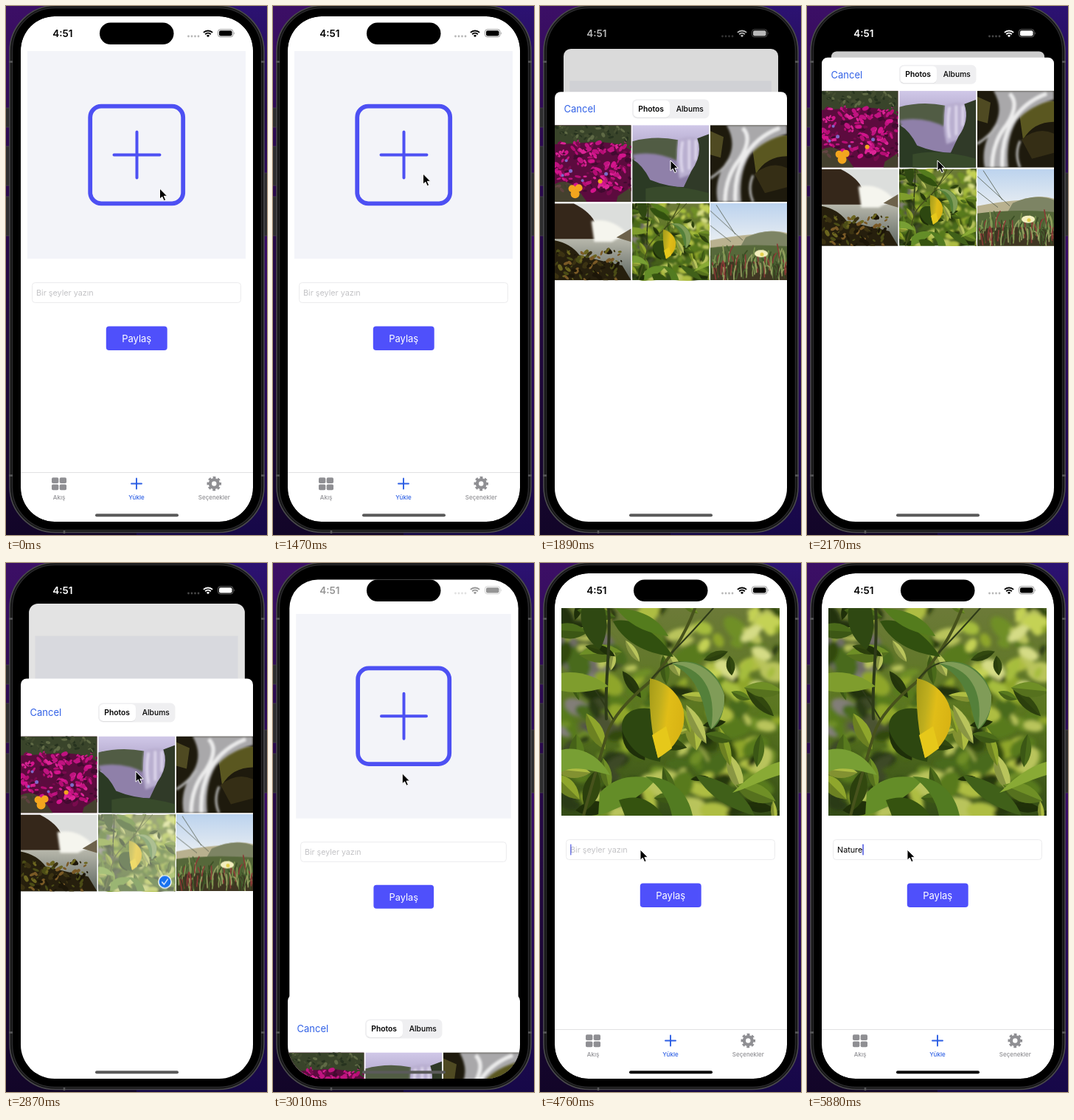
Write an HTML page that moves like this. It is 354 px wide and 716 px high and loops after 6.02 s.

```html
<!DOCTYPE html>
<html lang="tr">
<head>
<meta charset="utf-8">
<style>
  html, body { margin: 0; width: 100%; height: 100%; overflow: hidden; background: #1c0a4c; }
  svg { display: block; }
  #stage { width: 354px; height: 716px; }
  text { font-family: Inter, "Open Sans", sans-serif; }
  .mid { text-anchor: middle; }
  .tab { font-size: 8px; font-weight: 500; }
</style>
</head>
<body>
<svg id="stage" viewBox="0 0 354 716">
  <defs>
    <linearGradient id="wallL" x2="0" y2="1">
      <stop offset="0" stop-color="#3c0f66"/><stop offset=".25" stop-color="#2c0a50"/>
      <stop offset=".6" stop-color="#22083f"/><stop offset="1" stop-color="#120528"/>
    </linearGradient>
    <linearGradient id="wallR" x2="0" y2="1">
      <stop offset="0" stop-color="#2c1272"/><stop offset=".2" stop-color="#220a4c"/>
      <stop offset=".45" stop-color="#380c66"/><stop offset="1" stop-color="#160848"/>
    </linearGradient>
    <linearGradient id="mist" x2="0" y2="1">
      <stop offset="0" stop-color="#d0c8e8"/><stop offset=".7" stop-color="#8d7fa8"/>
    </linearGradient>
    <linearGradient id="sky" x2="0" y2="1">
      <stop offset="0" stop-color="#bcd3ee"/><stop offset=".5" stop-color="#e9eef2"/>
    </linearGradient>
    <linearGradient id="pool" x2="0" y2="1">
      <stop offset="0" stop-color="#b8b8ac"/><stop offset="1" stop-color="#5e6660"/>
    </linearGradient>
    <linearGradient id="gold" y2=".3">
      <stop offset="0" stop-color="#a59b18"/><stop offset=".35" stop-color="#bfae1e"/>
      <stop offset=".6" stop-color="#e0bd18"/><stop offset="1" stop-color="#d9b414"/>
    </linearGradient>
    <linearGradient id="wood" x2="0" y2="1">
      <stop offset="0" stop-color="#6c7a38"/><stop offset=".5" stop-color="#5a761f"/><stop offset="1" stop-color="#344c17"/>
    </linearGradient>
    <filter id="soft"><feGaussianBlur stdDeviation="2.4"/></filter>
    <filter id="haze"><feGaussianBlur stdDeviation="1.4"/></filter>
    <clipPath id="screen"><rect x="20" y="14" width="315" height="684" rx="46"/></clipPath>
    <clipPath id="cardClip"><rect id="cardShape" x="20" y="14" width="315" height="684"/></clipPath>

    <symbol id="leafPic" viewBox="0 0 296 281" preserveAspectRatio="xMidYMid slice">
      <rect width="296" height="281" fill="url(#wood)"/>
      <g id="bokeh" filter="url(#soft)"></g>
      <g id="sprigs"></g>
      <g fill="none" stroke="#2e3a18" stroke-linecap="round">
        <path d="M64 0C68 50 58 100 61 150" stroke-width="4"/>
        <path d="M182 -2C165 45 140 75 122 98C95 120 70 145 62 170C50 210 38 250 30 281" stroke="#47521c" stroke-width="4"/>
        <path d="M120 98C140 75 152 72 166 74M70 150C55 125 42 100 25 92M150 60C170 40 190 18 206 0" stroke-width="2"/>
      </g>
      <path d="M28 -2C22 22 34 44 52 56C64 36 62 15 58 -2Z" fill="#2f4812"/>
      <path d="M70 18C98 10 132 35 152 66C122 62 88 52 70 18Z" fill="#31500f"/>
      <path d="M74 0C104 2 130 10 145 38C116 34 92 24 74 0Z" fill="#547c1d"/>
      <path d="M0 88C22 84 48 92 64 106C40 114 18 116 0 112Z" fill="#7f9d2d"/>
      <path d="M120 136C92 132 76 150 84 170C96 196 114 205 134 208C138 180 134 150 120 136Z" fill="#2d4710"/>
      <path d="M150 75C185 64 215 88 221 118C222 144 212 160 203 164C194 150 196 122 176 96C168 86 158 80 150 75Z" fill="#54803a"/>
      <path d="M150 75C190 80 212 110 203 164C214 152 222 140 221 118C212 88 182 66 150 75Z" fill="#809c58"/>
      <path d="M0 192C26 186 52 200 66 226C40 220 18 212 0 222Z" fill="#789f34"/>
      <path d="M52 250C76 224 105 226 128 232C112 252 88 268 50 281Z" fill="#648d28"/>
      <path d="M114 228C150 228 172 250 178 281L150 281C146 258 132 240 114 228Z" fill="#527b21"/>
      <path d="M78 260C104 250 126 262 138 281H86Z" fill="#35530f"/>
      <path d="M182 226C220 230 250 250 262 281C230 272 202 258 182 226Z" fill="#406019"/>
      <path d="M232 250C254 228 274 214 296 208V226C274 232 252 244 232 250Z" fill="#89aa35"/>
      <path d="M120 95C146 100 171 125 166 155C162 180 145 195 131 203C122 170 118 130 120 95Z" fill="url(#gold)"/>
      <path d="M123 172L142 160L150 190L131 203Z" fill="#e6c81a"/>
    </symbol>

    <symbol id="pic0" viewBox="0 0 104 104">
      <rect width="104" height="104" fill="#5c0b3e"/>
      <path d="M0 0H104V34C80 18 50 24 0 26Z" fill="#39442a"/>
      <g id="petals"></g>
      <path d="M0 80Q18 70 34 90L44 104H0ZM104 84L86 96L84 104H104Z" fill="#3d5228" opacity=".75"/>
      <g fill="#7e69c8"><circle cx="22" cy="62" r="2.5"/><circle cx="11" cy="68" r="2"/><circle cx="70" cy="66" r="2.5"/><circle cx="38" cy="75" r="2"/><circle cx="16" cy="48" r="2"/></g>
      <g fill="#f3a51e"><circle cx="24" cy="86" r="5"/><circle cx="33" cy="85" r="5"/><circle cx="28" cy="93" r="6"/><circle cx="62" cy="76" r="3"/></g>
    </symbol>
    <symbol id="pic1" viewBox="0 0 104 104">
      <rect width="104" height="104" fill="url(#mist)"/>
      <path d="M0 22Q30 14 62 20L60 52Q40 50 26 44Q14 42 0 48Z" fill="#515c44"/>
      <g filter="url(#haze)">
        <path d="M0 40Q34 34 64 50L70 82H18Z" fill="#8f80a9"/>
        <path d="M62 20Q76 14 90 18Q92 44 80 66L64 72Q58 46 62 20Z" fill="#b9afd0"/>
        <path d="M68 22Q64 44 68 64M77 20V60M86 20V48" fill="none" stroke="#e2dcf0" stroke-width="3"/>
      </g>
      <path d="M104 12L88 18Q96 40 80 62L60 104H104Z" fill="#303a28"/>
      <path d="M0 46Q14 54 24 74Q48 84 74 84L64 104H0Z" fill="#2b3a24"/>
      <path d="M18 86Q52 78 104 92V104H18Z" fill="#384a2b"/>
    </symbol>
    <symbol id="pic2" viewBox="0 0 104 104">
      <rect width="104" height="104" fill="#1e1a0d"/>
      <path d="M56 24Q78 12 104 14V42Q76 42 62 66Z" fill="#5a5720"/>
      <path d="M60 66Q82 48 104 58V84L74 92Z" fill="#352e15"/>
      <path d="M0 8L18 16L14 44L0 40Z" fill="#4f4a22"/>
      <g filter="url(#haze)">
        <path d="M22 0H104V12Q72 20 54 40Q38 66 42 104H10Q4 74 24 46Q36 24 22 0Z" fill="#a9a8aa"/>
        <path d="M44 4Q58 18 40 46Q20 70 20 104M94 4Q62 16 46 44Q32 70 34 104" fill="none" stroke="#ececec" stroke-width="5"/>
        <path d="M58 68Q50 86 58 104M0 72Q16 62 28 46" fill="none" stroke="#b8b8b8" stroke-width="3"/>
      </g>
    </symbol>
    <symbol id="pic3" viewBox="0 0 104 104">
      <rect width="104" height="104" fill="#dcdedc"/>
      <path d="M0 0H26Q50 12 56 28V56H0Z" fill="#35271a"/>
      <path d="M0 48H104V104H0Z" fill="url(#pool)"/>
      <path d="M50 24Q76 18 98 40L78 52H54Z" fill="#f5f5ee" filter="url(#haze)"/>
      <path d="M104 34L84 46L104 52Z" fill="#6d624b"/>
      <path d="M0 50Q22 54 34 70Q64 78 92 84L104 104H0Z" fill="#261f0d"/>
      <g id="moss"></g>
    </symbol>
    <symbol id="pic5" viewBox="0 0 104 104">
      <rect width="104" height="104" fill="url(#sky)"/>
      <path d="M0 50Q30 44 58 42Q84 34 104 40V104H0Z" fill="#b9b18f"/>
      <path d="M48 46Q80 32 104 42V60H40Z" fill="#7d8464"/>
      <path d="M0 60Q50 54 104 58V104H0Z" fill="#56683a"/>
      <path d="M0 82Q50 74 104 84V104H0Z" fill="#3f3622"/>
      <g id="grass" fill="none" stroke-width="1.6"></g>
      <path d="M0 10L44 50M8 2L34 42M0 30L28 52" stroke="#545c4c" stroke-width=".8"/>
      <ellipse cx="69" cy="68" rx="9" ry="5" fill="#f3efbe"/><circle cx="70" cy="69" r="2.5" fill="#e4cf4c"/>
    </symbol>
  </defs>

  <rect width="177" height="716" fill="url(#wallL)"/>
  <rect x="177" width="177" height="716" fill="url(#wallR)"/>
  <g fill="#2d2d2f" stroke="#48484a" stroke-width=".7">
    <rect x="-3" y="138" width="9" height="26" rx="1.5"/>
    <rect x="-3" y="190" width="9" height="53" rx="1.5"/>
    <rect x="-3" y="258" width="9" height="53" rx="1.5"/>
    <rect x="348" y="226" width="9" height="85" rx="1.5"/>
  </g>
  <rect x="5" y="-.5" width="345" height="713" rx="62" fill="#141415" stroke="#4a4a4c" stroke-width="1.6"/>
  <rect x="8.5" y="2.5" width="338" height="707" rx="58" fill="#000" stroke="#29292b" stroke-width="1.5"/>
  <path d="M4 75.5H9M4 635.5H9M346 75.5H351M346 635.5H351M79 710V714" stroke="#58585a" stroke-width="2.5"/>

  <g clip-path="url(#screen)">
    <rect width="354" height="716"/>
    <g id="card"><g clip-path="url(#cardClip)">
      <rect width="354" height="716" fill="#fff"/>
      <g id="empty">
        <rect x="29" y="61" width="296" height="281" fill="#f3f4f9"/>
        <g fill="none" stroke="#4d50f3">
          <rect x="114.2" y="135.7" width="126" height="131.6" rx="15" stroke-width="5.8"/>
          <path d="M177.5 170.5V232.5M146.500 201.5H208.5" stroke-width="4" stroke-linecap="round"/>
        </g>
      </g>
      <use id="chosen" href="#leafPic" x="29" y="61" width="296" height="281"/>
      <rect x="35.5" y="374.5" width="283" height="27" rx="4" fill="#fff" stroke="#ebebed"/>
      <text id="hint" x="41" y="392" font-size="10.8" fill="#c3c3c6">Bir şeyler yazın</text>
      <text id="entry" x="41" y="392" font-size="10.8"></text>
      <rect id="caret" y="380.5" width="1.5" height="15" rx=".7" fill="#4a55e0"/>
      <rect x="135.8" y="433.5" width="82.9" height="32.4" rx="4" fill="#4f50fb"/>
      <text class="mid" x="177.2" y="454.5" font-size="13" fill="#fff">Paylaş</text>
      <path d="M19 631.5H336" stroke="#e1e1e3"/>
      <g fill="#8f8f93">
        <rect x="62" y="638.3" width="9.3" height="7.8" rx="1.8"/><rect x="72.7" y="638.3" width="9.3" height="7.8" rx="1.8"/>
        <rect x="62" y="647.5" width="9.3" height="7.8" rx="1.8"/><rect x="72.7" y="647.5" width="9.3" height="7.8" rx="1.8"/>
        <text class="tab mid" x="72" y="667.5">Akış</text>
        <text class="tab mid" x="282.3" y="667.5">Seçenekler</text>
      </g>
      <g fill="none" stroke="#8f8f93">
        <circle cx="282.3" cy="646.5" r="5.4" stroke-width="4.4"/>
        <circle cx="282.3" cy="646.5" r="8.3" stroke-width="3" stroke-dasharray="3.7 2.819" stroke-dashoffset="1.85"/>
      </g>
      <path d="M177 639.5V653.5M170 646.5H184" stroke="#2d5fe4" stroke-width="1.9" stroke-linecap="round"/>
      <text class="tab mid" x="177" y="667.5" fill="#2d5fe4">Yükle</text>
      <rect id="dim" width="354" height="716"/>
    </g></g>

    <g id="sheet">
      <rect x="20" width="315" height="760" rx="8" fill="#fff"/>
      <g id="bar">
        <text x="32.5" y="28" font-size="13" fill="#3161e6">Cancel</text>
        <rect x="125" y="10" width="104.5" height="26" rx="6.5" fill="#efeff1"/>
        <rect x="126.5" y="12.2" width="49.5" height="23" rx="5.5" fill="#00000018"/>
        <rect x="126.5" y="11.5" width="49.5" height="23" rx="5.5" fill="#fff"/>
        <text class="mid" x="150.7" y="26.8" font-size="10.3" font-weight="600">Photos</text>
        <text class="mid" x="203.3" y="26.8" font-size="10.3" font-weight="500">Albums</text>
      </g>
      <g id="grid">
        <g id="cells"></g>
        <g id="picked">
          <rect x="125.2" y="106" width="104" height="104" fill="#fff" opacity=".35"/>
          <circle cx="215.5" cy="197" r="8.6" fill="#1971ee" stroke="#fff" stroke-width="1.3"/>
          <path d="M211.7 197.5L214.4 200.5L219.3 193.5" fill="none" stroke="#fff" stroke-width="1.3" stroke-linecap="round"/>
        </g>
      </g>
    </g>
  </g>

  <rect x="127" y="22.5" width="100.5" height="29.5" rx="14.75"/>
  <g id="status" fill="currentColor">
    <text class="mid" x="76.8" y="42" font-size="13.5" font-weight="600">4:51</text>
    <g opacity=".28"><circle cx="247.5" cy="41" r="1.4"/><circle cx="252" cy="41" r="1.4"/><circle cx="256.5" cy="41" r="1.4"/><circle cx="261" cy="41" r="1.4"/></g>
    <path d="M267.9 35.9A8.8 8.8 0 0 1 280.1 35.9M270.2 38.3A5.5 5.5 0 0 1 277.8 38.3" fill="none" stroke="currentColor" stroke-width="2"/>
    <path d="M271.9 40A3 3 0 0 1 276.1 40L274 42.2Z"/>
    <rect x="287.5" y="31.7" width="20.5" height="10.2" rx="3.2" fill="none" stroke="currentColor" opacity=".4"/>
    <rect x="289" y="33.2" width="17.5" height="7.2" rx="2"/>
    <path d="M309.2 35V38.8Q310.8 36.9 309.2 35Z" opacity=".45"/>
  </g>
  <rect id="homeBar" x="121" y="687.3" width="113" height="4" rx="2"/>
  <path id="cursor" d="M0 0V14.2L3.3 11.2L5.7 16.6L8.2 15.5L5.8 10.3H10.2Z" stroke="#fff" stroke-width="1" stroke-linejoin="round"/>
</svg>
<script>
const LOOP = 6020, STEP = 70;
const OPEN = 1650, CLOSE = 2833.2, PICK = 2590, LOADED = 3850, FOCUS = 4270;
const SHEET_TOP = 69, SHEET_LOW = 698;
const WORD = 'Nature';
const keyTimes = [4970, 5320, 5530, 5670, 5810, 5880];
const trail = [ // time, x, y
  [0, 208.5, 247], [490, 203.5, 227], [1610, 203.5, 227], [1890, 177, 209],
  [2240, 177, 209], [2520, 176, 282], [2940, 176, 282], [3640, 150, 379],
  [3780, 150, 379], [4130, 136, 388]
];

const $ = id => document.getElementById(id);
const clamp = v => Math.max(0, Math.min(1, v));
const mix = (a, b, k) => a + (b - a) * k;
const smooth = k => k * k * (3 - 2 * k);
const spring = ms => {
  const x = Math.max(0, ms) * 0.0177;
  return 1 - (1 + x) * Math.exp(-x);
};
const show = (id, on) => $(id).style.display = on ? '' : 'none';

let seed = 7;
const rnd = (a = 0, b = 1) => {
  seed = (seed * 16807) % 2147483647;
  return a + (b - a) * seed / 2147483647;
};

function add(id, tag, attrs) {
  const el = document.createElementNS('http://www.w3.org/2000/svg', tag);
  for (const k in attrs) el.setAttribute(k, attrs[k]);
  $(id).append(el);
}

// Scatter tilted ellipses in a box
function scatter(id, n, [x0, y0, x1, y1], [r0, r1], colors) {
  for (let i = 0; i < n; i++) {
    const x = rnd(x0, x1), y = rnd(y0, y1), r = rnd(r0, r1);
    add(id, 'ellipse', {
      cx: x, cy: y, rx: r, ry: r * rnd(.35, .7),
      transform: `rotate(${rnd(-70, 70)} ${x} ${y})`,
      fill: colors[Math.floor(rnd(0, colors.length))]
    });
  }
}

// Pointed leaves with a darker lower half
function leaves(id, n, [x0, y0, x1, y1], [r0, r1], colors) {
  for (let i = 0; i < n; i++) {
    const r = rnd(r0, r1), w = r * rnd(.25, .45);
    const transform = `translate(${rnd(x0, x1)} ${rnd(y0, y1)}) rotate(${rnd(-20, 110)})`;
    const fill = colors[Math.floor(rnd(0, colors.length))];
    add(id, 'path', { d: `M${-r} 0Q0 ${-2 * w} ${r} 0Q0 ${2 * w} ${-r} 0Z`, transform, fill });
    add(id, 'path', { d: `M${-r} 0Q0 ${2 * w} ${r} 0Z`, transform, fill: '#1c2c0a', opacity: .3 });
  }
}

const GREENS = ['#8fa62c', '#aebd42', '#4a6a1a', '#6f8f26', '#26380c', '#b9c45c', '#587a1e', '#203009', '#32480f'];
scatter('bokeh', 20, [0, 0, 70, 180], [10, 24], ['#6f6c66', '#4c5230', '#827e78', '#5c6a30']);
scatter('bokeh', 150, [0, 0, 296, 281], [8, 24], GREENS);
scatter('bokeh', 16, [190, 0, 296, 120], [8, 18], ['#c4d254', '#a6bd3c', '#d5dc86']);
scatter('bokeh', 14, [0, 130, 90, 281], [8, 20], ['#54534c', '#2c3a16', '#3e4a26']);
leaves('sprigs', 46, [0, 0, 296, 281], [12, 30], GREENS);

scatter('petals', 190, [0, 22, 104, 92], [2, 5], ['#d3148c', '#b60d74', '#dc2496', '#7a0a4e', '#c01380', '#420a30']);
scatter('petals', 50, [0, 2, 104, 20], [1.5, 4], ['#27331f', '#5f6a45', '#434d30']);
scatter('moss', 90, [0, 64, 92, 104], [1.5, 5], ['#4b4c16', '#1c1608', '#6b651f', '#3b3212', '#7a5a26']);
for (let i = 0; i < 110; i++) {
  const x = rnd(0, 104), y = rnd(78, 106);
  add('grass', 'path', {
    d: `M${x} ${y}q${rnd(-3, 3)} -10 ${rnd(-6, 6)} ${-rnd(10, 24)}`,
    stroke: ['#7f9650', '#47602f', '#8a3a36', '#98a364', '#3a4d24'][i % 5]
  });
}

for (let i = 0; i < 6; i++) {
  const x = 19.5 + (i % 3) * 105.7, y = Math.floor(i / 3) * 106;
  add('cells', 'use', {
    href: i === 4 ? '#leafPic' : '#pic' + i, x, y, width: 104.2, height: 104
  });
}

function pointer(t) {
  let i = 0;
  while (i < trail.length - 2 && t >= trail[i + 1][0]) i++;
  const [t0, x0, y0] = trail[i], [t1, x1, y1] = trail[i + 1];
  const k = smooth(clamp((t - t0) / (t1 - t0)));
  return [mix(x0, x1, k), mix(y0, y1, k)];
}

function drawSheet(t) {
  const closing = t >= CLOSE;
  const left = spring(t - CLOSE);
  let p = closing ? 1 - left : spring(t - OPEN);
  if (p < .002) p = 0;
  const top = mix(SHEET_LOW, SHEET_TOP, p);
  const extra = closing ? clamp(left / .13) : 0;
  show('sheet', p > 0);
  $('sheet').setAttribute('transform', `translate(0 ${top})`);
  $('bar').setAttribute('transform', `translate(0 ${23 * extra})`);
  $('grid').setAttribute('transform', `translate(0 ${45 + 33 * extra})`);
  show('picked', t >= PICK);

  const scale = 1 - .082 * p;
  $('card').setAttribute('transform',
    `translate(177.5 ${14 + 47.5 * p}) scale(${scale}) translate(-177.5 -14)`);
  $('cardShape').setAttribute('rx', 8 + 38 * (1 - p));
  $('dim').setAttribute('opacity', .2 * p ** 4);

  const glow = closing ? 1 - clamp((t - CLOSE - 60) / 280) : clamp((t - OPEN) / 330);
  const tone = Math.round(255 * glow);
  $('status').style.color = `rgb(${tone},${tone},${tone})`;
}

function drawField(t) {
  const typed = keyTimes.filter(k => t >= k).length;
  const entry = $('entry');
  entry.textContent = WORD.slice(0, typed);
  show('hint', !typed);
  show('chosen', t >= LOADED);
  show('empty', t < LOADED);
  const fade = typed ? 1 : 1 - clamp((t - 4725) / 160);
  $('caret').setAttribute('x', typed ? 41 + entry.getComputedTextLength() : 41);
  $('caret').setAttribute('opacity', t >= FOCUS ? fade : 0);
  $('homeBar').setAttribute('fill', t >= FOCUS ? '#0a0a0a' : '#5a5a5a');
}

const start = performance.now();
function draw() {
  const t = Math.floor((performance.now() - start) % LOOP / STEP) * STEP;
  drawSheet(t);
  drawField(t);
  $('cursor').setAttribute('transform', `translate(${pointer(t)})`);
  requestAnimationFrame(draw);
}
draw();
</script>
</body>
</html>
```
